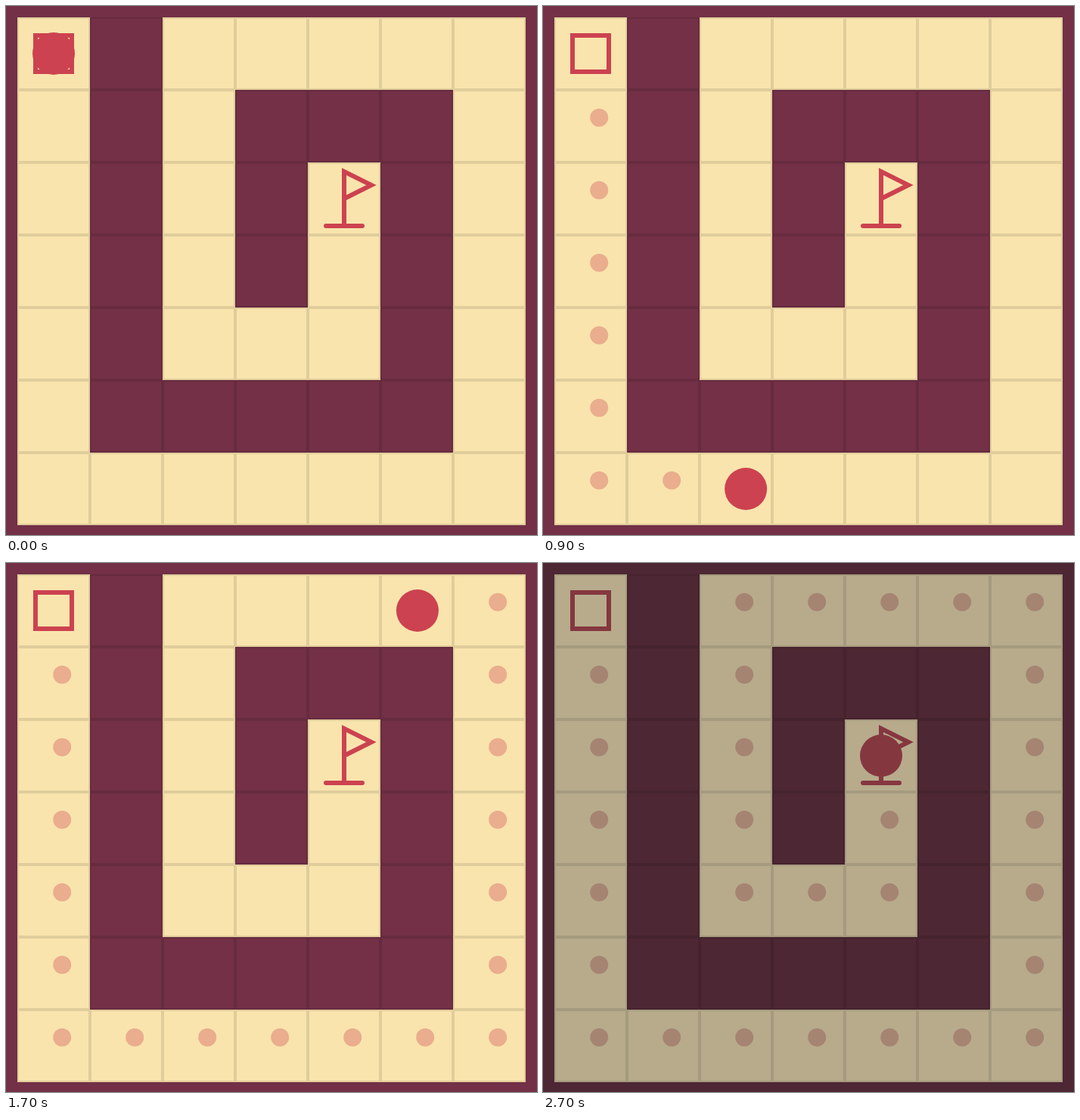
Animation of 702x700 px, one loop 2.9 s. Source, as an HTML page with a canvas:

```html
<!DOCTYPE html>
<html lang="en">
<head>
<meta charset="utf-8">
<title>Maze</title>
<style>
  html, body { margin: 0; width: 100%; height: 100%; overflow: hidden; background: #733046; }
  canvas { display: block; }
</style>
</head>
<body>
<canvas id="stage" width="702" height="700"></canvas>
<script>
const canvas = document.getElementById('stage');
const ctx = canvas.getContext('2d');

const LOOP = 2900, TICK = 100, DIM_AT = 2700;
const CELL = 96, PAD = 15;
const WALL = '#733046', FLOOR = '#f9e4ad', RED = '#cc4250';

const MAZE = [
  '.#.....',
  '.#.###.',
  '.#.#.#.',
  '.#.#.#.',
  '.#...#.',
  '.#####.',
  '.......'
];

// Corners of the route as [column, row]
const ROUTE = [[0, 0], [0, 6], [6, 6], [6, 0], [2, 0], [2, 4], [4, 4], [4, 2]];
const STEPS = 30;

// [time in ms, cells travelled]
const PACE = [[331, 0], [1200, 12.427], [1500, 16.5], [1700, 18.99], [2100, 24.18], [2500, STEPS]];

const center = n => PAD + CELL * (n + 0.5);

function travelled(t) {
  if (t <= PACE[0][0]) return 0;
  for (let i = 1; i < PACE.length; i++) {
    const [t0, d0] = PACE[i - 1], [t1, d1] = PACE[i];
    if (t <= t1) return d0 + (d1 - d0) * (t - t0) / (t1 - t0);
  }
  return STEPS;
}

function routePoint(d) {
  for (let i = 1; i < ROUTE.length; i++) {
    const [x0, y0] = ROUTE[i - 1], [x1, y1] = ROUTE[i];
    const len = Math.abs(x1 - x0) + Math.abs(y1 - y0);
    if (d <= len) {
      const k = d / len;
      return [center(x0 + (x1 - x0) * k), center(y0 + (y1 - y0) * k)];
    }
    d -= len;
  }
  return ROUTE[ROUTE.length - 1].map(center);
}

function disc(x, y, r) {
  ctx.beginPath();
  ctx.arc(x, y, r, 0, Math.PI * 2);
  ctx.fill();
}

function drawMaze() {
  ctx.fillStyle = WALL;
  ctx.fillRect(0, 0, canvas.width, canvas.height);
  ctx.lineWidth = 2;
  ctx.strokeStyle = 'rgba(0, 0, 0, 0.1)';
  MAZE.forEach((row, r) => [...row].forEach((kind, c) => {
    const x = PAD + c * CELL, y = PAD + r * CELL;
    ctx.fillStyle = kind === '#' ? WALL : FLOOR;
    ctx.fillRect(x, y, CELL, CELL);
    ctx.strokeRect(x + 1, y + 1, CELL - 2, CELL - 2);
  }));
}

function drawMarks() {
  ctx.strokeStyle = RED;
  ctx.lineWidth = 6;
  ctx.strokeRect(center(0) - 24, center(0) - 24, 48, 48);

  const x = center(4), y = center(2);
  ctx.lineCap = 'butt';
  ctx.beginPath();
  ctx.moveTo(x, y + 36);
  ctx.lineTo(x, y - 36);
  ctx.lineTo(x + 36, y - 18);
  ctx.lineTo(x, y);
  ctx.stroke();
  ctx.lineCap = 'round';
  ctx.beginPath();
  ctx.moveTo(x - 24, y + 36);
  ctx.lineTo(x + 24, y + 36);
  ctx.stroke();
}

function draw(t) {
  const d = travelled(t);
  drawMaze();
  ctx.fillStyle = RED;
  ctx.globalAlpha = 0.34;
  for (let i = 1; i <= d && i < STEPS; i++) {
    const [x, y] = routePoint(i);
    disc(x + 11.2, y - 11.2, 12);
  }
  ctx.globalAlpha = 1;
  drawMarks();
  disc(...routePoint(d), 28);
  canvas.style.filter = t >= DIM_AT ? 'grayscale(0.25) brightness(0.75)' : 'none';
}

const start = performance.now();
function frame() {
  const t = (performance.now() - start) % LOOP;
  draw(Math.floor(t / TICK) * TICK);
  requestAnimationFrame(frame);
}
frame();
</script>
</body>
</html>
```
